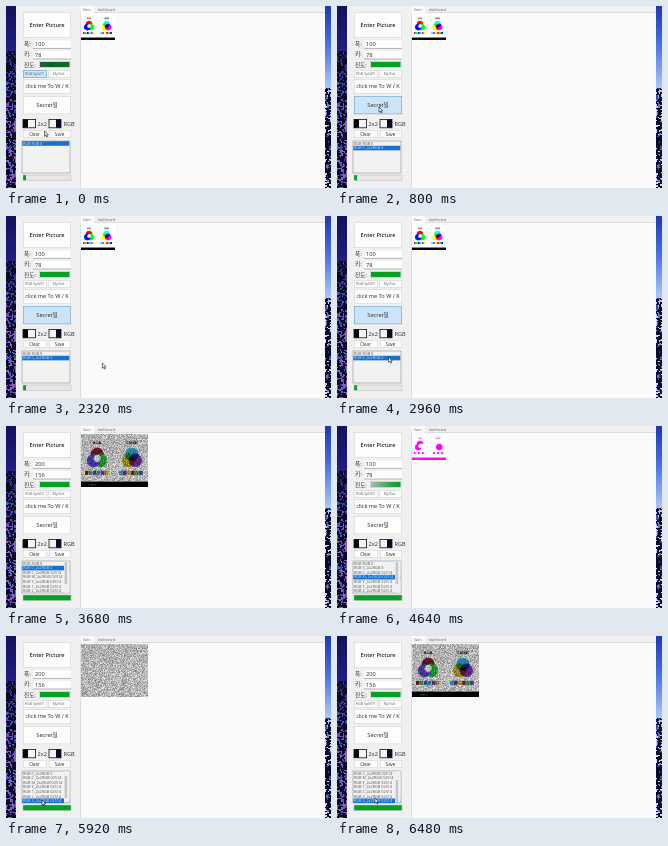
An HTML page with a canvas for the animation above (6560 ms loop, 325 by 182 pixels).

```html
<!DOCTYPE html>
<html lang="ko">
<head>
<meta charset="utf-8">
<title>Picture splitter</title>
<style>
html, body { margin: 0; width: 100%; height: 100%; overflow: hidden; background: #f0f0f0; }
canvas, svg { position: absolute; left: 0; top: 0; width: 325px; height: 182px; }
text { font-family: "Open Sans", "Noto Sans CJK KR", "Noto Sans CJK", sans-serif; fill: #2a2a2a; font-size: 5.6px; }
.mid { text-anchor: middle; }
.small { font-size: 4.4px; }
.tiny { font-size: 3.5px; fill: #666; }
.button { fill: #fdfdfd; stroke: #d4d4d4; stroke-width: .6; }
.button.on { fill: #cce4f7; stroke: #6a9fc8; }
.field { fill: #fff; stroke: #e4e4e4; stroke-width: .4; }
.line { stroke: #888; stroke-width: .6; }
.track { fill: #e6e6e6; stroke: #bcbcbc; stroke-width: .5; }
.green { fill: #06a027; }
.list { fill: #f2f2f2; stroke: #8a8f96; stroke-width: .6; }
.frame { fill: #f4f4f4; stroke: #111; stroke-width: .8; }
#rows text { font-size: 3.8px; fill: #555; }
#rows text.on { fill: #cfe2f8; }
</style>
</head>
<body>
<canvas id="stage" width="325" height="182"></canvas>
<svg viewBox="0 0 325 182">
  <defs>
    <linearGradient id="sheen">
      <stop offset="0" stop-color="#a9b9ad"/>
      <stop offset=".75" stop-color="#22a23e"/>
      <stop offset="1" stop-color="#06a027"/>
    </linearGradient>
    <linearGradient id="dim">
      <stop offset="0" stop-color="#35563f"/>
      <stop offset=".3" stop-color="#0b6425"/>
      <stop offset="1" stop-color="#0a6e28"/>
    </linearGradient>
    <clipPath id="listClip"><rect x="16" y="135" width="47.5" height="32"/></clipPath>
    <clipPath id="clickClip"><rect x="19.5" y="73" width="44" height="15"/></clipPath>
  </defs>

  <text class="tiny" x="77" y="4.8">Gain</text>
  <text class="tiny" x="91.5" y="4.8">dashboard</text>

  <rect class="button" x="17.3" y="6.3" width="47.4" height="25.4"/>
  <text class="mid" x="41" y="20.6" font-weight="600">Enter Picture</text>

  <text x="18" y="39.8">폭:</text>
  <rect class="field" x="27" y="34" width="38" height="8.5"/>
  <path class="line" d="M27 42.4h38"/>
  <text id="wide" x="29" y="40.2"></text>
  <text x="18" y="50.2">키:</text>
  <rect class="field" x="27" y="44.5" width="38" height="8.5"/>
  <path class="line" d="M27 53h38"/>
  <text id="high" x="29" y="50.6"></text>
  <text x="18" y="60.6">진도:</text>
  <rect class="track" x="33.5" y="55.5" width="30.5" height="6"/>
  <rect id="depth" x="34" y="56" width="29.5" height="5"/>

  <rect class="button" id="split" x="17.3" y="64.3" width="23.4" height="7.4"/>
  <text class="mid tiny" x="28.5" y="69.2">RGB Split(T)</text>
  <rect class="button" x="42.3" y="64.3" width="22.4" height="7.4"/>
  <text class="mid tiny" x="52.5" y="69.2">My/Svk</text>
  <rect class="button" x="17.3" y="73.3" width="47.4" height="14.4"/>
  <text class="mid" x="41" y="82.2" clip-path="url(#clickClip)">click me To W / K</text>
  <rect class="button" id="secret" x="17.3" y="90.5" width="47.4" height="17.4"/>
  <text class="mid" x="41" y="101.3">Secret일</text>

  <rect class="frame" x="17" y="113.4" width="12.6" height="8.4"/>
  <path d="M17 113.4h5v8.4h-5z" fill="#080812"/>
  <text x="31.5" y="119.6">2x2</text>
  <rect class="frame" x="43" y="113.4" width="12" height="8.4"/>
  <path d="M50 113.4h5v8.4h-5z" fill="#080c28"/>
  <text x="57.5" y="119.6">RGB</text>

  <rect class="button" x="17.3" y="124.3" width="23.4" height="7.4"/>
  <text class="mid small" x="28.5" y="129.6">Clear</text>
  <rect class="button" x="43.3" y="124.3" width="21.4" height="7.4"/>
  <text class="mid small" x="53.5" y="129.6">Save</text>

  <rect class="list" x="16" y="135" width="48" height="32"/>
  <g clip-path="url(#listClip)">
    <rect id="mark" x="16.3" width="47.2" height="4.6" fill="#1670cf"/>
    <g id="rows"></g>
    <g id="scroll">
      <rect x="58" y="135.3" width="5.7" height="31.4" fill="#f0f0f0"/>
      <rect id="thumb" x="58.6" width="2.6" height="22" fill="#c4c6c9"/>
    </g>
  </g>

  <rect class="track" x="17" y="169" width="48" height="5.5"/>
  <rect class="green" id="progress" x="17.2" y="169.2" height="5.1"/>

  <path id="cursor" d="M0 0v5.3l1.3-1.2 .9 2 .8-.4-.9-1.9h1.6z" fill="#fff" stroke="#111" stroke-width=".6"/>
</svg>
<script>
const LOOP = 6560, STEP = 80, ROW = 4.55;
const $ = id => document.getElementById(id);
const ctx = $('stage').getContext('2d');

const items = ['RGB RGB 0', 'RGB 0_2x2RGB 0', 'RGB C_2x2RGB 02514',
  'RGB M_2x2RGB 02514', 'RGB Y_2x2RGB 02514', 'RGB 1_2x2RGB 02514',
  'RGB 2_2x2RGB 02514', 'RGB 3_2x2RGB 02514', 'RGB 4_2x2RGB 02514'];

// time, selected row, picture
const picks = [[0, 0, 'base'], [720, 1, 'base'], [3600, 1, 'overlay'], [4080, 2, 'cyan'],
  [4480, 3, 'magenta'], [4800, 4, 'yellow'], [5040, 5, 'noise'], [5280, 6, 'noise'],
  [5680, 7, 'noise'], [6080, 8, 'overlay']];

// time, x, y
const path = [[0, 38.5, 125], [480, 41, 100], [800, 42, 101], [1520, 110.5, 147],
  [2080, 110.5, 147], [2800, 56, 147], [3040, 50, 139], [4800, 44, 155],
  [5280, 36, 164], [6000, 36, 164], [6400, 38, 162], [LOOP, 38, 162]];

function random(seed) {
  return () => {
    seed = (seed * 1664525 + 1013904223) >>> 0;
    return seed / 4294967296;
  };
}

function layer(w, h, draw) {
  const c = document.createElement('canvas');
  c.width = w;
  c.height = h;
  draw(c.getContext('2d'));
  return c;
}

function disc(g, x, y, r, color) {
  g.fillStyle = color;
  g.beginPath();
  g.arc(x, y, r, 0, 7);
  g.fill();
}

function trio(g, cx, cy, colors) {
  colors.forEach((color, i) => {
    const a = (i * 120 - 90) * Math.PI / 180;
    disc(g, cx + 6 * Math.cos(a), cy + 6 * Math.sin(a), 10, color);
  });
}

const art = (rgb, cmy) => layer(100, 78, g => {
  g.fillStyle = '#fff';
  g.fillRect(0, 0, 100, 78);
  trio(g, 24, 36, rgb);
  disc(g, 24, 36, 5.5, '#fff');
  g.globalCompositeOperation = 'multiply';
  trio(g, 76, 36, cmy);
  g.globalCompositeOperation = 'source-over';
  [...rgb, ...cmy, ...cmy, ...rgb].forEach((color, i) => {
    g.fillStyle = color;
    g.fillRect((i < 6 ? 6 : 21) + i * 6, 54, 5, 6);
  });
  g.fillStyle = '#000';
  g.fillRect(0, 70, 100, 8);
  g.textAlign = 'center';
  g.font = 'bold 6px "Open Sans", sans-serif';
  g.fillText('RGB', 24, 15);
  g.fillText('CMYK', 76, 15);
  g.fillStyle = '#aaa';
  g.font = '4px "Open Sans", sans-serif';
  g.fillText('colors', 17, 75.5);
});

const base = art(['#f00', '#0f0', '#00f'], ['#0ff', '#f0f', '#ff0']);
const muted = art(['#8a1a2c', '#2ccc38', '#5a48d8'], ['#28b4e0', '#8a30b8', '#d0c02c']);

const plane = keep => layer(100, 78, g => {
  g.drawImage(base, 0, 0);
  const img = g.getImageData(0, 0, 100, 78);
  for (let i = 0; i < img.data.length; i++)
    if (i % 4 < 3 && i % 4 !== keep) img.data[i] = 255;
  g.putImageData(img, 0, 0);
});

const noise = layer(67, 53, g => {
  const rnd = random(7);
  for (let y = 0; y < 53; y++)
    for (let x = 0; x < 67; x++) {
      const v = 115 + (rnd() + rnd()) * 65 | 0;
      g.fillStyle = `rgb(${v},${v},${v})`;
      g.fillRect(x, y, 1, 1);
    }
});

const overlay = layer(67, 53, g => {
  g.drawImage(noise, 0, 0);
  g.globalCompositeOperation = 'multiply';
  g.imageSmoothingQuality = 'high';
  g.drawImage(muted, 0, 0, 67, 53);
});

const pictures = { base, noise, overlay, cyan: plane(0), magenta: plane(1), yellow: plane(2) };

// Night sky over a dark treeline with lit specks.
const wallpaper = layer(325, 182, g => {
  const rnd = random(21);
  const strip = (x, w, sky, trees, specks) => {
    const fill = g.createLinearGradient(0, 0, 0, 120);
    sky.forEach((c, i) => fill.addColorStop(i / (sky.length - 1), c));
    g.fillStyle = fill;
    g.fillRect(x, 0, w, 182);
    for (let i = 0; i < w * 50; i++) {
      const y = trees + rnd() * (182 - trees);
      g.fillStyle = rnd() < .85 ? '#080a26' : specks[rnd() * specks.length | 0];
      g.fillRect(x + rnd() * (w - 1) | 0, y | 0, 2, 1 + rnd() * 3 | 0);
    }
  };
  strip(0, 10, ['#14125a', '#1e1c80', '#4a3cb4', '#8a5cc0'], 45, ['#2c48b0', '#7a4ab8', '#3a62c8']);
  strip(319, 6, ['#2038b0', '#4a74e4', '#a8c4f8', '#d0d4f8'], 82, ['#2b4fa8', '#6a6fd0']);
  g.fillStyle = '#f0f0f0';
  g.fillRect(10, 0, 309, 182);
  g.fillStyle = '#fafafa';
  g.fillRect(74, 7, 245, 175);
  g.fillRect(75, 0, 13, 7);
  g.fillStyle = '#dedede';
  g.fillRect(74, 7, 1, 175);
  g.fillRect(88, 6, 231, 1);
});

const labels = items.map(name => {
  const el = document.createElementNS('http://www.w3.org/2000/svg', 'text');
  el.textContent = name;
  el.setAttribute('x', 17);
  $('rows').append(el);
  return el;
});

function pointer(t) {
  const i = path.findIndex(p => p[0] > t);
  const [t0, x0, y0] = path[i - 1], [t1, x1, y1] = path[i];
  const k = (t - t0) / (t1 - t0), e = k * k * (3 - 2 * k);
  return [x0 + (x1 - x0) * e, y0 + (y1 - y0) * e];
}

function render(t) {
  const [, row, name] = picks.filter(p => p[0] <= t).pop();
  const large = name === 'noise' || name === 'overlay';
  const count = t < 720 ? 1 : t < 3600 ? 2 : items.length;
  const scroll = Math.max(0, row - 6);

  ctx.drawImage(wallpaper, 0, 0);
  ctx.imageSmoothingQuality = 'high';
  if (large) ctx.drawImage(pictures[name], 75, 8);
  else ctx.drawImage(pictures[name], 75, 8, 33.5, 26.2);

  $('wide').textContent = large ? 200 : 100;
  $('high').textContent = large ? 156 : 78;
  $('depth').setAttribute('fill', t < 320 ? 'url(#dim)' : t >= 4400 && t < 4880 ? 'url(#sheen)' : '#06a027');
  $('split').classList.toggle('on', t < 640);
  $('secret').classList.toggle('on', t >= 640 && t < 3040);

  labels.forEach((el, i) => {
    el.setAttribute('y', 138.8 + (i - scroll) * ROW);
    el.style.display = i < count ? '' : 'none';
    el.classList.toggle('on', i === row);
  });
  $('mark').setAttribute('y', 135.2 + (row - scroll) * ROW);
  $('scroll').style.display = count > 7 ? '' : 'none';
  $('thumb').setAttribute('y', 136 + scroll * 4);

  const done = Math.min(1, Math.max(.06, (t - 3040) / 560));
  $('progress').setAttribute('width', 47.6 * done);

  const [x, y] = pointer(t);
  $('cursor').setAttribute('transform', `translate(${x} ${y})`);
  $('cursor').style.display = t >= 3440 && t < 4880 ? 'none' : '';
}

const start = performance.now();
let last = -1;
function tick() {
  const t = Math.floor((performance.now() - start) % LOOP / STEP) * STEP;
  if (t !== last) render(last = t);
  requestAnimationFrame(tick);
}
tick();
</script>
</body>
</html>
```
